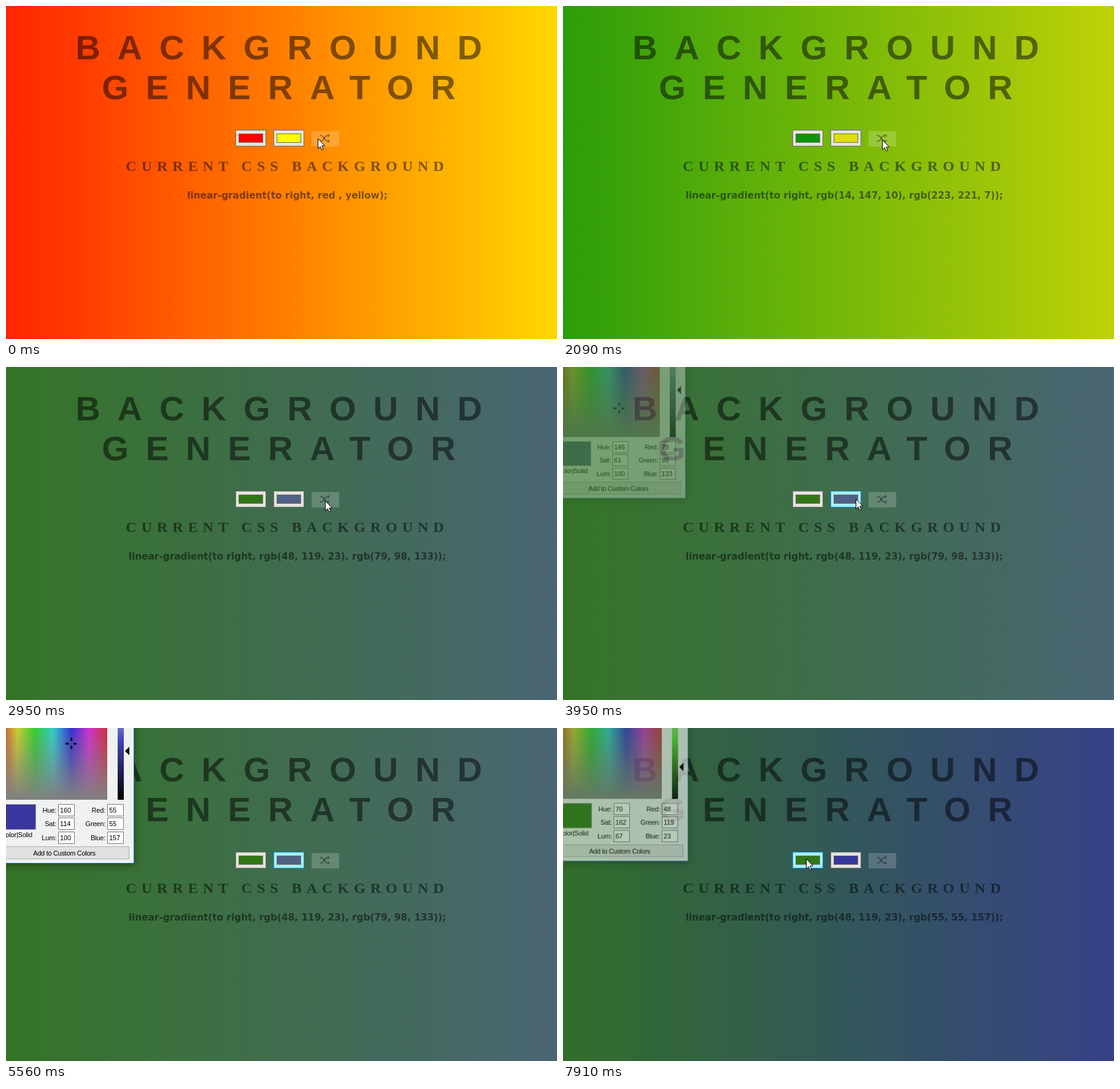
An HTML page with a canvas for the animation above (7990 ms loop, 898x543 px).

```html
<!DOCTYPE html>
<html lang="en">
<head>
<meta charset="utf-8">
<title>Background Generator</title>
<style>
html, body { margin: 0; width: 100%; height: 100%; overflow: hidden; }
canvas { display: block; }
</style>
</head>
<body>
<canvas id="stage" width="898" height="543"></canvas>
<script>
const W = 898, H = 543, LOOP = 7990, MID = 458.5, PAGE = 1280;
const TICK = 73, FADE = 220, PAD = 20;
const SANS = '"Liberation Sans", Arial, sans-serif';
const SMALL = '11px ' + SANS;
const ctx = document.getElementById('stage').getContext('2d');
const layer = document.createElement('canvas');
layer.width = layer.height = 260;
const dlg = layer.getContext('2d');

const GREEN = [48, 119, 23], SLATE = [79, 98, 133], INDIGO = [55, 55, 157];

const themes = [
  { start: 0, from: [255, 0, 0], to: [255, 255, 0], label: 'red , yellow' },
  { start: 850, from: [14, 147, 10], to: [223, 221, 7] },
  { start: 2180, from: [37, 98, 218], to: [248, 38, 233] },
  { start: 2950, from: GREEN, to: SLATE },
  { start: 6570, from: GREEN, to: INDIGO },
];
const picks = [
  { start: 0, color: SLATE, hsl: [146, 61, 100] },
  { start: 4940, color: INDIGO, hsl: [160, 114, 100] },
  { start: 7000, color: GREEN, hsl: [70, 162, 67] },
];
const focus = [
  { start: 0 },
  { start: 3710, on: 'right' },
  { start: 6880 },
  { start: 7580, on: 'left' },
];
const dialogs = [{ open: 3950, close: 6570 }, { open: 7830, close: Infinity }];

const easeOut = p => 1 - (1 - p) ** 4;
const moves = [
  { start: 700, end: 850, x: 511, y: 215 },
  { start: 1310, end: 1470, x: 499, y: 217 },
  { start: 1620, end: 1770, x: 520, y: 218 },
  { start: 3330, end: 3480, x: 477, y: 215 },
  { start: 4330, end: 4480, x: 107, y: 28 },
  { start: 5340, end: 5560, x: -18, y: 199 },
  { start: 7000, end: 7000, x: -18, y: 123 },
  { start: 7190, end: 7350, x: 396, y: 213, ease: easeOut },
];

const rgb = c => `rgb(${c.join(', ')})`;
const mix = (a, b, p) => a + (b - a) * p;
const current = (list, t) => list.findLast(item => item.start <= t);

// The screen is sampled once per tick, so motion advances in even steps.
function progress(t, start, duration) {
  const step = Math.floor((t - start) / TICK) + 1;
  return Math.min(1, Math.max(0, step / (Math.floor(duration / TICK) + 1)));
}

function cursorAt(t) {
  let x = 508, y = 216;
  for (const move of moves) {
    const p = progress(t, move.start, move.end - move.start);
    const eased = move.ease ? move.ease(p) : p;
    x = mix(x, move.x, eased);
    y = mix(y, move.y, eased);
  }
  return { x: Math.round(x), y: Math.round(y) };
}

function box(g, x, y, w, h, fill, border) {
  g.fillStyle = border;
  g.fillRect(x, y, w, h);
  g.fillStyle = fill;
  g.fillRect(x + 1, y + 1, w - 2, h - 2);
}

function text(g, str, x, y, font, color, align = 'center', spacing = 0) {
  g.font = font;
  g.fillStyle = color;
  g.textAlign = align;
  g.letterSpacing = spacing + 'px';
  g.fontKerning = 'normal';
  g.fillText(str, x, y);
}

function gradient(g, x0, y0, x1, y1, colors) {
  const fill = g.createLinearGradient(x0, y0, x1, y1);
  colors.forEach((c, i) => fill.addColorStop(i / (colors.length - 1), c));
  return fill;
}

function polygon(g, points) {
  g.beginPath();
  points.forEach(([x, y]) => g.lineTo(x, y));
  g.closePath();
}

function drawPage({ from, to, label }) {
  ctx.fillStyle = gradient(ctx, MID - PAGE / 2, 0, MID + PAGE / 2, 0, [rgb(from), rgb(to)]);
  ctx.fillRect(0, 0, W, H);
  const ink = 'rgba(0, 0, 0, .5)';
  ['BACKGROUND', 'GENERATOR'].forEach((word, i) =>
    text(ctx, word, MID, 87 + 65 * i, 'bold 56px ' + SANS, ink, 'center', 28));
  text(ctx, 'CURRENT CSS BACKGROUND', MID, 269,
    'bold 24px "Liberation Serif", Times, serif', ink, 'center', 8);
  text(ctx, `linear-gradient(to right, ${label || rgb(from) + ', ' + rgb(to)});`, MID, 314,
    'bold 15.3px "DejaVu Sans", Verdana, sans-serif', ink);
}

function drawInput(x, color, focused, cursor) {
  const hovered = cursor.x >= x && cursor.x < x + 50 && cursor.y >= 202 && cursor.y < 229;
  const face = focused ? ['#a6efff', '#0a93dc']
    : hovered ? ['#e5f1fb', '#0078d7'] : ['#e4e3de', '#6f6e66'];
  box(ctx, x, 202, 50, 27, ...face);
  box(ctx, x + 5, 208, 40, 15, rgb(color), '#6f6e66');
}

function drawShuffle() {
  ctx.fillStyle = 'rgba(255, 255, 255, .19)';
  ctx.fillRect(498, 204, 45, 25);
  ctx.strokeStyle = ctx.fillStyle = 'rgba(0, 0, 0, .36)';
  ctx.lineWidth = 2;
  for (const side of [-1, 1]) {
    ctx.save();
    ctx.translate(511.5, 215.8);
    ctx.scale(1, side);
    ctx.beginPath();
    ctx.moveTo(0, -4.5);
    ctx.lineTo(2, -4.5);
    ctx.bezierCurveTo(7, -4.5, 7, 4.5, 12.8, 4.5);
    ctx.stroke();
    polygon(ctx, [[12.8, 1.3], [16.8, 4.5], [12.8, 7.7]]);
    ctx.fill();
    ctx.restore();
  }
}

function drawField(label, value, right, row) {
  const y = Math.floor(124 + row * 22.5);
  text(dlg, label + ':', right - 30, y + 14, SMALL, '#000', 'right', -.2);
  box(dlg, right - 27, y, 27, 20, '#fff', '#7a7a7a');
  text(dlg, value, right - 24, y + 14, SMALL, '#000', 'left', -.1);
}

function drawPicker({ color, hsl }) {
  const [hue, sat, lum] = hsl;
  const left = -11, top = -76, width = 176, height = 193, bottom = top + height;
  dlg.setTransform(1, 0, 0, 1, 0, 0);
  dlg.clearRect(0, 0, 260, 260);
  dlg.translate(PAD, PAD);

  dlg.shadowColor = 'rgba(0, 0, 0, .45)';
  dlg.shadowBlur = 12;
  dlg.shadowOffsetY = 2;
  dlg.fillStyle = '#1778bd';
  dlg.fillRect(-60, -60, 269, 281);
  dlg.shadowColor = 'transparent';
  dlg.fillStyle = '#f0f2f2';
  dlg.fillRect(-60, -60, 268, 280);

  // Hue runs across; saturation fades to grey downwards.
  const rainbow = Array.from({ length: 7 }, (_, i) => `hsl(${i * 60}, 100%, 50%)`);
  const fades = [
    gradient(dlg, left, 0, left + width, 0, rainbow),
    gradient(dlg, 0, top, 0, bottom, ['rgba(128, 128, 128, 0)', 'rgb(128, 128, 128)']),
  ];
  for (const fill of fades) {
    dlg.fillStyle = fill;
    dlg.fillRect(-PAD, -PAD, left + width + PAD, bottom + PAD);
  }

  const cx = Math.round(left + hue / 240 * width), cy = Math.round(bottom - sat / 240 * height);
  dlg.fillStyle = '#000';
  for (const d of [-9, 4]) {
    dlg.fillRect(cx + d, cy - 1, 5, 3);
    dlg.fillRect(cx - 1, cy + d, 3, 5);
  }

  const tone = l => `hsl(${hue * 1.5}, ${sat / 2.4}%, ${l}%)`;
  dlg.fillStyle = gradient(dlg, 0, top, 0, bottom, [100, 50, 0].map(tone));
  dlg.fillRect(182, -PAD, 10, bottom + PAD);
  const ly = bottom + 1 - lum / 240 * height;
  dlg.fillStyle = '#000';
  polygon(dlg, [[194, ly], [201, ly - 7], [201, ly + 7]]);
  dlg.fill();

  box(dlg, -40, 124, 89, 42, rgb(color), '#a0a0a0');
  text(dlg, 'Color|Solid', 43, 178, SMALL, '#000', 'right', -.2);
  ['Hue', 'Sat', 'Lum'].forEach((name, i) => drawField(name, hsl[i], 112, i));
  ['Red', 'Green', 'Blue'].forEach((name, i) => drawField(name, color[i], 192, i));
  box(dlg, -40, 193, 241, 21, '#e1e1e1', '#adadad');
  text(dlg, 'Add to Custom Colors', 95, 208, SMALL, '#000', 'center', -.3);
}

function drawDialog({ open, close }, t) {
  const shown = 1 - (1 - progress(t, open, FADE)) ** 1.5;
  const alpha = shown * (1 - progress(t, close, FADE)) ** 2;
  if (!alpha) return;
  const scale = mix(.945, 1, alpha);
  drawPicker(current(picks, t));
  ctx.save();
  ctx.globalAlpha = alpha;
  ctx.translate(-41, 38);
  ctx.scale(scale, scale);
  ctx.translate(41, -38);
  ctx.drawImage(layer, -PAD, -PAD);
  ctx.restore();
}

function drawCursor({ x, y }) {
  ctx.save();
  ctx.translate(x + .5, y + .5);
  polygon(ctx, [[0, 0], [0, 16], [3.7, 12.6], [6.2, 18], [8.6, 17], [6.2, 11.5], [11, 11.3]]);
  ctx.fillStyle = '#fff';
  ctx.fill();
  ctx.strokeStyle = '#000';
  ctx.lineWidth = 1;
  ctx.stroke();
  ctx.restore();
}

function frame() {
  const t = performance.now() % LOOP;
  const theme = current(themes, t), focused = current(focus, t).on, cursor = cursorAt(t);
  drawPage(theme);
  drawInput(374, theme.from, focused === 'left', cursor);
  drawInput(436, theme.to, focused === 'right', cursor);
  drawShuffle();
  dialogs.forEach(dialog => drawDialog(dialog, t));
  drawCursor(cursor);
  requestAnimationFrame(frame);
}
frame();
</script>
</body>
</html>
```
